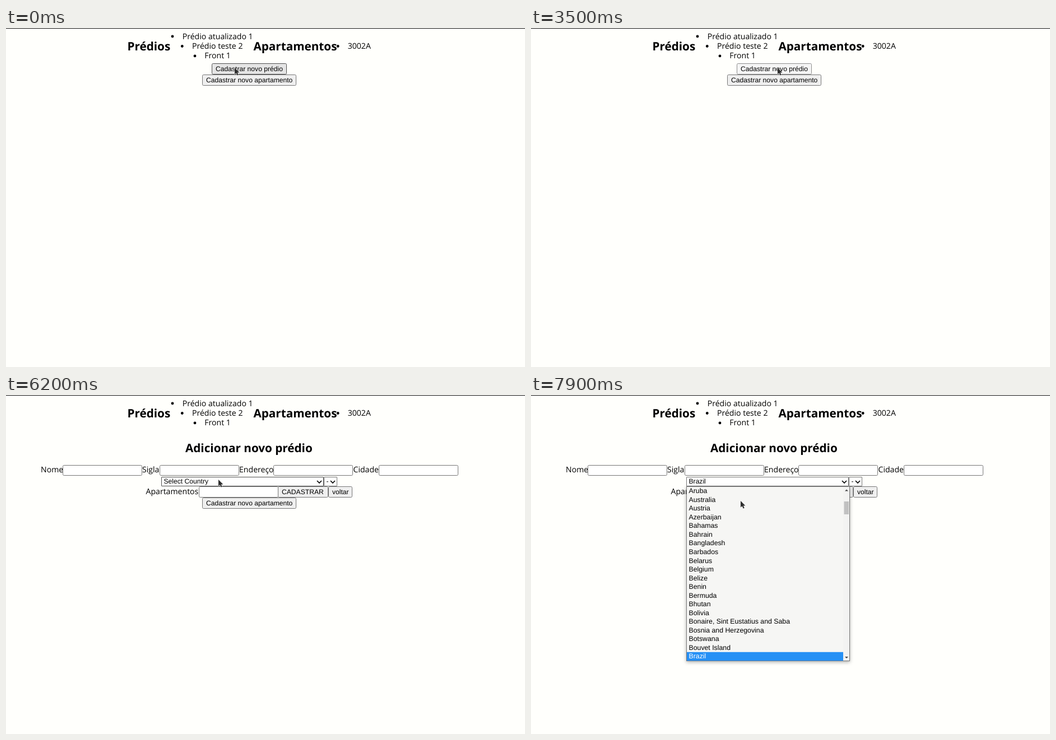
These frames come from a looping animation (926x605 px, 8000 ms). An HTML page:

```html
<!DOCTYPE html>
<html lang="pt">
<head>
<meta charset="utf-8">
<title>Prédios</title>
<style>
html, body { margin: 0; width: 100%; height: 100%; overflow: hidden; background: #fffffc; }
svg { display: block; }
text { font: 14.1px "Open Sans", "Noto Sans", sans-serif; text-rendering: geometricPrecision; white-space: pre; }
text.title { font-size: 20.7px; font-weight: 700; }
text.control { font: 12.13px "Liberation Sans", Arial, sans-serif; }
text.option { font: 12.3px "Liberation Sans", Arial, sans-serif; }
.widget rect { stroke: #767676; fill: #fff; }
.widget.button rect { fill: #efefef; }
.widget.hover rect { stroke: #4f4f4f; }
.widget.button.hover rect { fill: #e5e5e5; }
.widget.button.pressed rect { fill: #f5f5f5; stroke: #8d8d8d; }
.chevron { fill: none; stroke: #000; stroke-width: 1.7; }
#popup { filter: drop-shadow(0 2px 3px rgba(0, 0, 0, .3)); }
</style>
</head>
<body>
<svg id="stage" width="926" height="605" viewBox="0 0 926 605"></svg>
<script>
const LOOP = 8000, STEP = 100;
const ROW = 15.53, ROWS = 20, LIST_TOP = 163.7;

const COUNTRIES = ("Select Country|Afghanistan|Åland Islands|Albania|Algeria|American Samoa|Andorra|Angola|" +
  "Anguilla|Antarctica|Antigua and Barbuda|Argentina|Armenia|Aruba|Australia|Austria|Azerbaijan|Bahamas|" +
  "Bahrain|Bangladesh|Barbados|Belarus|Belgium|Belize|Benin|Bermuda|Bhutan|Bolivia|" +
  "Bonaire, Sint Eustatius and Saba|Bosnia and Herzegovina|Botswana|Bouvet Island|Brazil").split("|");

// Pointer runs: start time, then one position per step.
const POINTER = [
  [0, [408, 71]],
  [1000, [414, 71], [419, 71]],
  [1400, [432, 72], [455, 75], [482, 78], [510, 74], [533, 67], [570, 58], [605, 51]],
  [2200, [520, 38], [440, 31]],
  [2500, [425, 20], [410, 8], [385, 1], [355, 6], [340, 20], [352, 38], [385, 55], [420, 65], [436, 64]],
  [3500, [440, 71]],
  [4000, [446, 78], [465, 95], [495, 115], [530, 135], [559, 149], [585, 158], [608, 168], [613, 180], [600, 185]],
  [5000, [570, 180], [545, 177], [550, 180], [575, 178], [590, 172]],
  [5600, [565, 164], [510, 152], [430, 138], [385, 135]],
  [6100, [376, 147], [379, 151]],
  [6600, [387, 184]],
  [6800, [380, 186], [374, 189]]
].flatMap(([start, ...points]) => points.map(([x, y], i) => ({ at: start + i * STEP, x, y })));

const STATES = [
  { at: 0, view: "home" },
  { at: 3500, view: "home", pressed: true },
  { at: 3700, view: "form" },
  { at: 6400, view: "form", open: true, selected: 0, offset: 0 },
  { at: 6600, view: "form", open: true, selected: 1, offset: 0 },
  { at: 7600, view: "form", open: true, selected: 17, offset: 0, value: "Bahamas" },
  { at: 7900, view: "form", open: true, selected: 32, offset: 13, value: "Brazil" }
];

const stage = document.getElementById("stage");
const widgets = [];

function add(parent, tag, attrs = {}, content = "") {
  const node = document.createElementNS("http://www.w3.org/2000/svg", tag);
  for (const key in attrs) node.setAttribute(key, attrs[key]);
  node.textContent = content;
  return parent.appendChild(node);
}

const label = (parent, x, y, content, type = "") =>
  add(parent, "text", { x, y, class: type }, content);

function widget(parent, x, y, right, bottom, type = "") {
  const node = add(parent, "g", { class: "widget " + type });
  add(node, "rect", { x: x + .5, y: y + .5, width: right - x - 1, height: bottom - y - 1, rx: type === "select" ? 0.5 : 2 });
  widgets.push({ node, parent, x, y, right, bottom });
  return node;
}

function button(parent, x, y, right, content) {
  const node = widget(parent, x, y, right, y + 20, "button");
  label(node, x + 7, y + 14, content, "control");
  return node;
}

function select(parent, x, right, content) {
  const node = widget(parent, x, 146, right, 163, "select");
  add(node, "path", { class: "chevron", d: `M${right - 12} 153l4 4 4-4` });
  return label(node, x + 4.5, 158.4, content, "control");
}

function bulletItem(dotX, x, y, content) {
  add(stage, "circle", { cx: dotX, cy: y - 4.5, r: 2.4 });
  label(stage, x, y, content);
}

add(stage, "rect", { width: 926, height: 605, fill: "#fffffc" });
add(stage, "rect", { width: 926, height: 1.2, fill: "#333" });
label(stage, 216.5, 39.5, "Prédios", "title");
label(stage, 441.5, 39.5, "Apartamentos", "title");
bulletItem(297, 314.7, 19.5, "Prédio atualizado 1");
bulletItem(314.3, 332, 37, "Prédio teste 2");
bulletItem(337, 354.3, 54.4, "Front 1");
bulletItem(592.2, 609.7, 37, "3002A");

const home = add(stage, "g");
const newBuilding = button(home, 367, 63, 501, "Cadastrar novo prédio");
button(home, 350, 83, 518, "Cadastrar novo apartamento");

const form = add(stage, "g");
label(form, 320, 101.5, "Adicionar novo prédio", "title");
[["Nome", 62, 101], ["Sigla", 243, 274], ["Endereço", 416, 477], ["Cidade", 619.5, 665]].forEach(([name, x, left]) => {
  label(form, x, 138.4, name);
  widget(form, left, 125, left + 142, 144);
});
label(form, 249.5, 177.2, "Apartamentos");
widget(form, 344, 163, 486, 183);
button(form, 485, 163, 575, "CADASTRAR");
button(form, 575, 163, 618, "voltar");
button(form, 350, 183, 518, "Cadastrar novo apartamento");
const countryValue = select(form, 277, 567, COUNTRIES[0]);
select(form, 567, 591, "-");

const popup = add(stage, "g", { id: "popup" });
add(popup, "rect", { x: 277.5, y: 163.5, width: 291, height: 311, fill: "#f6f6f4", stroke: "#767676" });
const highlight = add(popup, "rect", { x: 278, width: 279, height: ROW, fill: "#2690f5" });
const options = Array.from({ length: ROWS }, (_, i) => label(popup, 281.5, LIST_TOP + 11.6 + i * ROW, "", "option"));
add(popup, "rect", { x: 557, y: 164, width: 11, height: 310, fill: "#f3f3f2" });
const thumb = add(popup, "rect", { x: 558.5, width: 8.5, height: 23, fill: "#c1c1c1" });
const upArrow = add(popup, "path", { d: "M560 171.5h6l-3-3z" });
add(popup, "path", { d: "M560 467h6l-3 3z", fill: "#444" });

const pointer = add(stage, "path", {
  d: "M0 0V11.6L2.7 9.2 4.7 13.6 6.7 12.7 4.8 8.4H8.4Z",
  fill: "#2e2e2e", stroke: "#f4f4f4", "stroke-width": 1, "paint-order": "stroke"
});

const latest = (steps, t) => steps.findLast(step => step.at <= t);
const show = (node, visible) => node.setAttribute("display", visible ? "inline" : "none");

function render(t) {
  const state = latest(STATES, t), { x, y } = latest(POINTER, t);
  const view = state.view === "home" ? home : form;
  show(home, view === home);
  show(form, view === form);
  show(popup, state.open);
  pointer.setAttribute("transform", `translate(${x} ${y})`);

  for (const w of widgets) {
    const inside = x >= w.x && x < w.right && y >= w.y && y < w.bottom;
    w.node.classList.toggle("hover", inside && w.parent === view && !(state.open && y > 163));
  }
  newBuilding.classList.toggle("pressed", !!state.pressed);
  countryValue.textContent = state.value || COUNTRIES[0];

  if (!state.open) return;
  const { offset, selected } = state;
  options.forEach((option, i) => {
    option.textContent = COUNTRIES[offset + i];
    option.setAttribute("fill", offset + i === selected ? "#fff" : "#000");
  });
  highlight.setAttribute("y", LIST_TOP + (selected - offset) * ROW);
  thumb.setAttribute("y", 175 + offset * 1.15);
  upArrow.setAttribute("fill", offset ? "#444" : "#a3a3a3");
}

const start = performance.now();
function tick() {
  render((performance.now() - start) % LOOP);
  requestAnimationFrame(tick);
}
tick();
</script>
</body>
</html>
```
